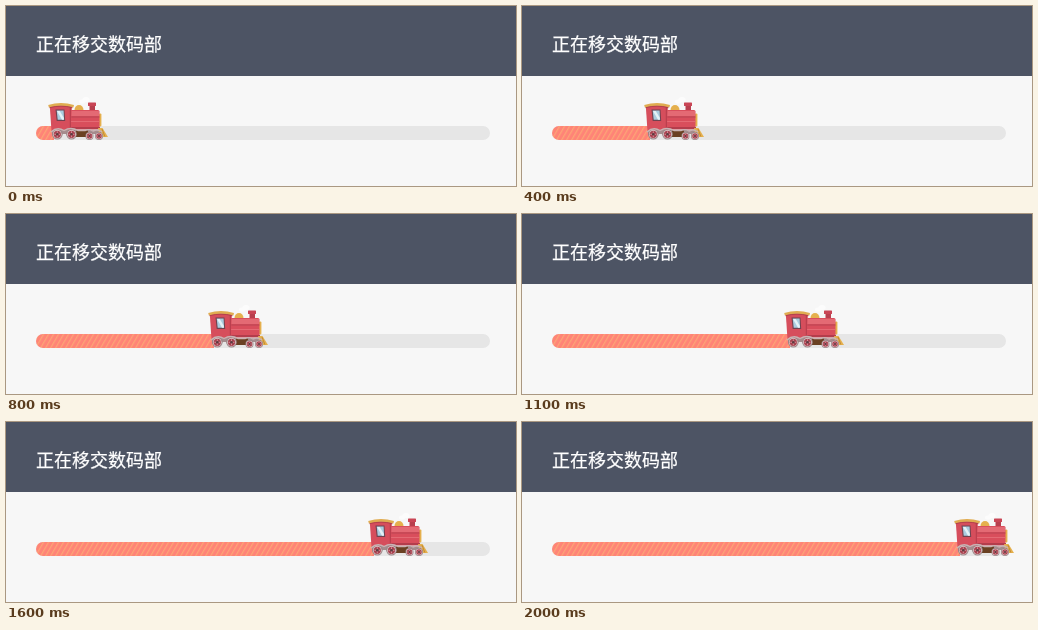
These frames come from a looping animation (510x180 px, 2100 ms). An HTML page:

```html
<!DOCTYPE html>
<html lang="zh-CN">
<head>
<meta charset="utf-8">
<style>
  html, body { margin: 0; width: 100%; height: 100%; overflow: hidden; background: #f7f7f7; }
  svg { display: block; }
  text { font: 500 18px "Noto Sans CJK SC", "Noto Sans CJK", sans-serif; fill: #fff; stroke: #fff; stroke-width: .25px; }
</style>
</head>
<body>
<svg width="510" height="180" viewBox="0 0 510 180">
  <defs>
    <pattern id="stripes" width="5" height="14" patternUnits="userSpaceOnUse" patternTransform="translate(30 120) skewX(-30)">
      <rect width="5" height="14" fill="#ff8477"/>
      <rect x="2" width="1.4" height="14" fill="#fca576"/>
    </pattern>
    <clipPath id="track"><rect x="30" y="120" width="454" height="14" rx="7"/></clipPath>
    <g id="wheel">
      <circle r="5.3" fill="#9a8486"/>
      <circle r="4.3" fill="#e3cdce"/>
      <circle r="3.6" fill="#a8414f"/>
      <path d="M-3 0H3M0 -3V3" stroke="#dba3a6" stroke-width=".8"/>
      <circle r="1.3" fill="#5b3a40"/>
    </g>
  </defs>

  <rect width="510" height="70" fill="#4d5464"/>
  <text x="30" y="44.5">正在移交数码部</text>

  <g clip-path="url(#track)">
    <rect x="30" y="120" width="454" height="14" fill="#e6e6e6"/>
    <rect id="fill" x="30" y="120" height="14" fill="url(#stripes)"/>
  </g>

  <g id="train">
    <!-- smoke -->
    <g fill="#fff" opacity=".7">
      <ellipse cx="34" cy="95.5" rx="3" ry="2"/>
      <ellipse cx="38" cy="93.5" rx="3.5" ry="2.5"/>
    </g>
    <!-- boiler, dome and chimney -->
    <path d="M26.5 104a4.5 5 0 0 1 9 0z" fill="#e5b04d"/>
    <path d="M41.5 99H47V105H41.5z" fill="#b83f4e"/>
    <rect x="40" y="96.4" width="8" height="3.6" rx=".6" fill="#c94555"/>
    <rect x="51" y="107.5" width="2.4" height="13" rx="1" fill="#e5b04d"/>
    <rect x="22" y="104" width="29.5" height="19.5" rx="1.5" fill="#d94e5c"/>
    <rect x="23" y="105" width="28" height="5" fill="#e46a74"/>
    <path d="M22 111H51.5" stroke="#b94452"/>
    <path d="M22 115.5H51.5" stroke="#e46a74"/>
    <path d="M22 122H52" stroke="#b43d4c" stroke-width="2"/>
    <!-- cab -->
    <path d="M1.8 99.5H24L22.5 126H3.5z" fill="#d64e5c"/>
    <path d="M22.3 101V124" stroke="#b43d4c"/>
    <path d="M.2 99Q13 94.8 26 99L25.4 101.4Q13 98 .9 101.4z" fill="#e0ac51"/>
    <path d="M1.5 101.7Q13 98.6 24.5 101.7" fill="none" stroke="#a83b49" stroke-width=".8"/>
    <path d="M7.5 103.5H16.5L17.2 115H8.7z" fill="#6f4350"/>
    <path d="M8.7 104.6H15.6L16.1 113.8H9.7z" fill="#a9cde0"/>
    <path d="M9 105H11.7L15.9 112V113.8H14z" fill="#e4f1f6"/>
    <!-- undercarriage -->
    <path d="M4 124H53V128H4z" fill="#a58c8d"/>
    <rect x="28" y="124.5" width="12" height="6.5" fill="#6a4123"/>
    <path d="M50 122H54.5L60 131H52z" fill="#e5b04d"/>
    <path d="M54 123L56.8 130.5M52.5 124V130" stroke="#b68030" stroke-width=".8"/>
    <use href="#wheel" x="9.3" y="128.3"/>
    <use href="#wheel" x="23.5" y="128.3"/>
    <use href="#wheel" transform="translate(41.5 130) scale(.76)"/>
    <use href="#wheel" transform="translate(51 130) scale(.76)"/>
    <path d="M3 126Q9 120.5 16 124.5Q23 120.5 30 124.5H37Q41 122.5 45 125Q50 122.5 54 126" fill="none" stroke="#c9b3b4" stroke-width="1.4"/>
  </g>
</svg>
<script>
  const train = document.getElementById("train");
  const fill = document.getElementById("fill");

  function draw() {
    const step = Math.floor(performance.now() / 100) % 21;
    const x = Math.min(42 + 20 * step, 432);
    train.setAttribute("transform", `translate(${x} 0)`);
    fill.setAttribute("width", x - 24);
    requestAnimationFrame(draw);
  }
  draw();
</script>
</body>
</html>
```
